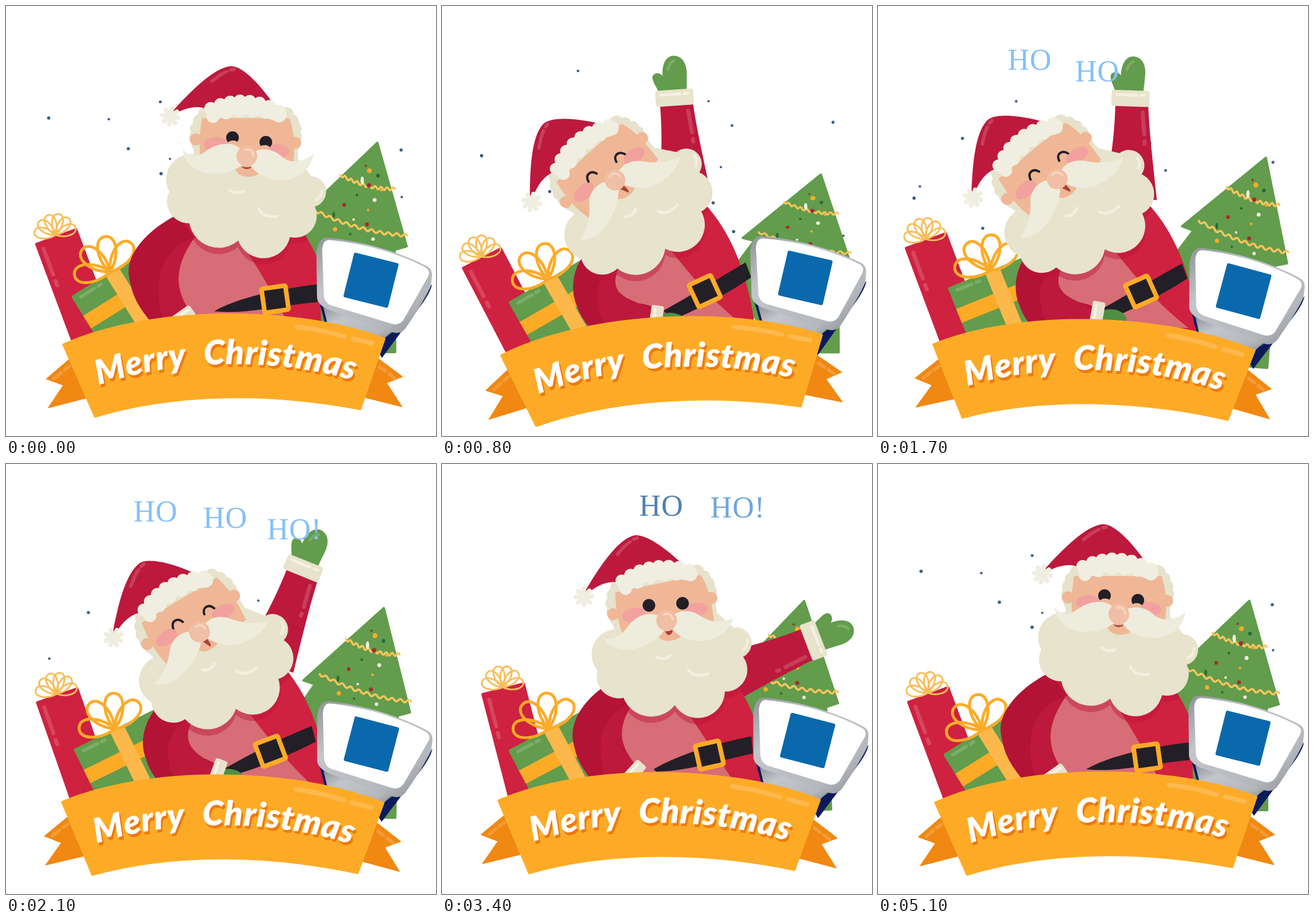
Animation, 748 px wide and 748 px high, one loop 5.2 s. Source, as an HTML page:

```html
<!DOCTYPE html>
<html lang="en">
<head>
<meta charset="utf-8">
<title>Merry Christmas</title>
<style>
  html, body { margin: 0; width: 100%; height: 100%; overflow: hidden; background: #fff; }
  svg { display: block; width: 100vw; height: 100vh; }
  .line { fill: none; stroke-linecap: round; stroke-linejoin: round; }
  .shine { fill: none; stroke: #fff; stroke-opacity: .16; stroke-linecap: round; }
  .ho { font: 52px "Liberation Serif", "Times New Roman", serif; letter-spacing: 1px; }
  .title { font: italic 900 59px Lato, "Open Sans", sans-serif; text-anchor: middle; letter-spacing: .8px; word-spacing: 18px; }
</style>
</head>
<body>
<svg viewBox="0 0 748 748">
  <defs>
    <clipPath id="bodyClip"><path id="clipShape"/></clipPath>
    <path id="beardShape" d="M-80,0 A44,44 0 0 0 -135,62 A38,38 0 0 0 -100,117 A52,52 0 0 0 -15,147 A47,47 0 0 0 75,141 A38,38 0 0 0 118,88 A27,27 0 0 0 112,35 L82,-5 Z"/>
    <path id="titleArc" d="M126,674 C262,612 484,604 640,664"/>
    <linearGradient id="metal" x2="1" y2="1">
      <stop offset="0" stop-color="#8f9398"/><stop offset=".3" stop-color="#c2c5c9"/>
      <stop offset=".75" stop-color="#b4b7bb"/><stop offset="1" stop-color="#85898f"/>
    </linearGradient>
  </defs>

  <g id="snow" fill="#3d5d82"></g>

  <g id="tree">
    <path fill="#629c4c" stroke="#629c4c" stroke-width="4" stroke-linejoin="round"
      d="M0,2 L51,182 L30,188 L31,366 L-60,366 L-170,222 L-116,138 L-136,132 Z"/>
    <path id="garlands" class="line" stroke="#fcc45c" stroke-width="3.6"/>
    <g id="baubles"></g>
  </g>

  <g id="redGift">
    <path d="M2,0 H76 Q78,0 78,3 V240 H0 V3 Q0,0 2,0Z" fill="#cf2140"/>
    <path class="shine" stroke-width="7" d="M11,14 V62 M11,74 V82"/>
    <g id="redBow" class="line" stroke="#f8bd59" stroke-width="3" transform="translate(39 -1) rotate(14)"></g>
  </g>

  <g id="greenGift">
    <path d="M3,0 H170 V150 H0 V3 Q0,0 3,0Z" fill="#629c4c"/>
    <path fill="#fdab27" d="M0,40 H170 V66 H0Z"/>
    <path fill="#fdb84c" d="M70,0 H97 V150 H70Z"/>
    <path class="shine" stroke-width="6" d="M14,10 H42 M50,10 H56"/>
    <g id="greenBow" class="line" stroke="#fdab27" stroke-width="5" transform="translate(80 0)"></g>
  </g>

  <g id="arm">
    <path fill="#bd193c" d="M-26,8 L31,8 C35,60 42,105 52,175 L-40,175 C-32,120 -25,70 -26,8Z"/>
    <path class="shine" stroke-width="7" d="M22,24 L26,62 M27,74 V78"/>
    <path fill="#629c4c" d="M-27,-10 C-28,-18 -36,-28 -36,-38 C-34,-47 -22,-46 -18,-39 C-18,-60 -10,-73 3,-73 C20,-72 26,-55 24,-38 L22,-10Z"/>
    <path class="shine" stroke-width="5" d="M-8,-50 Q-4,-62 3,-64"/>
    <rect x="-33" y="-14" width="66" height="28" rx="4" fill="#e7e3cc"/>
    <path class="line" stroke="#f4f1e2" stroke-width="5" d="M-24,-6 H10 M18,-6 H24"/>
  </g>

  <g id="body">
    <path id="torso" fill="#cf2140"/>
    <path id="belly" fill="#d76d76"/>
    <path id="sleeve" fill="#b31335"/>
    <path id="sleeveFold" fill="#bd193c"/>
    <g clip-path="url(#bodyClip)">
      <use id="beardShadow" href="#beardShape" fill="#b9153a" fill-opacity=".42"/>
    </g>
  </g>
  <path id="belt" fill="#231f26"/>
  <g id="buckle">
    <rect x="-21" y="-21" width="42" height="42" rx="2" fill="#231f26" stroke="#fdab27" stroke-width="8"/>
  </g>
  <g id="hand">
    <ellipse cx="28" cy="10" rx="24" ry="14" fill="#4f8f45"/>
    <rect x="-11" y="-13" width="22" height="40" rx="4" fill="#e7e3cc"/>
    <path class="line" stroke="#f4f1e2" stroke-width="5" d="M-4,-6 V16"/>
  </g>

  <g id="head">
    <path fill="#e6e2cc" d="M-86,-60 C-80,-96 66,-100 82,-60 L90,-40 L88,30 L-88,24 L-96,-30Z"/>
    <path id="curls" class="line" stroke="#e6e2cc" stroke-width="24"/>
    <use href="#beardShape" fill="#e7e3cc"/>
    <path class="line" stroke="#f2efdf" stroke-width="5" d="M-30,59 Q-18,68 -6,61 M20,91 Q26,107 52,105 M120,76 Q130,72 131,60"/>
    <path fill="#bd193c" d="M-130,-77 C-95,-116 -58,-152 -30,-156 C-8,-160 28,-118 48,-88 L-60,-76 C-80,-92 -108,-84 -128,-72Z"/>
    <path class="shine" stroke-width="6" d="M-61,-130 Q-45,-143 -35,-147 M-28,-150 L-22,-151"/>
    <path fill="#efb796" d="M-78,-66 C-84,-30 -84,0 -76,24 L80,24 C83,-10 84,-40 74,-66Z"/>
    <path class="line" stroke="#efb796" stroke-width="21" d="M-89,-29h0M84,-23h0"/>
    <path class="line" stroke="#f0eee0" stroke-width="26" d="M-58,-76 Q0,-98 56,-72"/>
    <path id="fur" class="line" stroke="#f0eee0" stroke-width="22"/>
    <g id="pompom" class="line" stroke="#f0eee0" stroke-width="8" transform="translate(-133 -69)"></g>
    <g fill="#f2a19f">
      <ellipse cx="-54" cy="-21" rx="21" ry="12" transform="rotate(-3 -54 -21)"/>
      <ellipse cx="53" cy="-9" rx="21" ry="12" transform="rotate(6 53 -9)"/>
    </g>
    <g id="openEyes">
      <path class="line" stroke="#231f26" stroke-width="22" d="M-25,-32h0M33,-24h0"/>
      <g id="squint" fill="#efb796">
        <ellipse cx="-24" cy="-22" rx="9" ry="5"/><ellipse cx="31" cy="-14" rx="9" ry="5"/>
      </g>
    </g>
    <path id="shutEyes" class="line" stroke="#231f26" stroke-width="4" d="M-36,-29 C-33,-42 -20,-42 -16,-30 M23,-22 C26,-35 39,-34 43,-22"/>
    <ellipse cx="3" cy="23" rx="22" ry="13" fill="#efb796"/>
    <path id="mouth" fill="#a8433a"/>
    <g fill="#eeecdc"><path id="stacheL"/><path id="stacheR"/></g>
    <circle r="18" fill="#f0bfa5"/>
    <path class="line" stroke="#f6d3bf" stroke-width="4" d="M-2,-11 Q10,-13 11,0"/>
  </g>

  <g id="device">
    <path fill="#0c1a5c" d="M741,484 Q740,494 726,515 L654,612 L640,590 L690,555Z M541,500 L556,556 L575,556 L552,512Z"/>
    <path fill="url(#metal)" d="M552,524 L560,556 Q610,590 655,582 L676,560Z"/>
    <path fill="url(#metal)" d="M560,403 C620,409 685,428 733,453 Q742,458 741,470 L739,487 C730,508 706,545 694,562 Q686,571 674,568 L560,528 Q543,520 541,508 L540,430 Q543,402 560,403Z"/>
    <path fill="#fff" d="M562,407 C620,412 685,431 730,455 Q739,461 734,471 L692,545 Q685,556 672,553 L566,521 Q554,516 553,504 L550,424 Q551,407 562,407Z"/>
    <rect x="-40" y="-40" width="80" height="80" rx="3" fill="#0a69ac" transform="translate(635 477) rotate(14)"/>
  </g>

  <g id="banner">
    <g fill="#f08812">
      <path d="M112,612 L69,649 L99,660 L72,700 L142,682Z"/>
      <path d="M644,610 L691,645 L663,656 L690,698 L618,680Z"/>
    </g>
    <path class="shine" stroke-width="6" d="M84,648 L96,638 M102,633 L110,627 M650,628 L660,635 M667,640 L676,647"/>
    <path fill="#fdab27" stroke="#fdab27" stroke-width="4" stroke-linejoin="round"
      d="M100,589 C250,522 500,520 658,579 L616,701 C470,673 300,670 155,714Z"/>
    <path class="line" stroke="#fdb94f" stroke-width="8" d="M506,558 Q550,563 589,575 M604,579 L637,587"/>
    <text class="title" fill="#ee7a10" transform="translate(3 5)"><textPath href="#titleArc" startOffset="50%">Merry Christmas</textPath></text>
    <text class="title" fill="#fff"><textPath href="#titleArc" startOffset="50%">Merry Christmas</textPath></text>
  </g>

  <text class="ho">HO</text>
  <text class="ho">HO</text>
  <text class="ho">HO!</text>
</svg>

<script>
const LOOP = 5200, STEP = 100;
const $ = id => document.getElementById(id);
const clamp = v => Math.max(0, Math.min(1, v));
const lerp = (a, b, k) => a + (b - a) * k;
const mix = (a, b, k) => a.map((v, i) => lerp(v, b[i], k));
const set = (id, d) => $(id).setAttribute('d', d);

function ramp(t, from, to) {
  const u = clamp((t - from) / (to - from));
  return u * u * (3 - 2 * u);
}
const hold = (t, a, b, c, d) => ramp(t, a, b) - ramp(t, c, d);

function seeded(seed) {
  return () => (seed = seed * 16807 % 2147483647) / 2147483647;
}

function add(parent, tag, attrs) {
  const el = document.createElementNS('http://www.w3.org/2000/svg', tag);
  for (const k in attrs) el.setAttribute(k, attrs[k]);
  return parent.appendChild(el);
}

// Blends two paths of the same structure.
function morph([a, b], k) {
  const nums = b.match(/-?[\d.]+/g);
  let i = 0;
  return a.replace(/-?[\d.]+/g, n => lerp(+n, +nums[i++], k).toFixed(1));
}

// Each pair is upright, leaning.
const bodyShapes = {
  torso: [
    'M300,365 C240,395 205,440 216,480 C222,515 240,535 262,560 L548,560 L546,450 C535,420 520,395 500,370Z',
    'M270,415 C225,440 222,495 235,522 C241,540 250,552 262,565 L546,565 L543,548 C533,480 510,400 455,342Z'],
  belly: [
    'M328,403 C285,435 280,470 290,490 C300,515 320,535 335,560 L494,560 C470,510 440,455 400,400Z',
    'M310,455 C283,480 296,514 340,517 C365,520 398,530 400,560 L530,560 C470,515 430,465 390,415Z'],
  sleeve: [
    'M300,362 C240,392 205,437 215,475 C221,512 240,535 260,560 L345,560 C320,535 300,515 290,490 C280,470 285,435 328,403Z',
    'M270,415 C225,440 222,495 235,522 C241,540 250,552 262,565 L385,565 C385,530 365,520 340,517 C296,514 283,480 310,450Z'],
  sleeveFold: [
    'M328,403 C268,420 250,485 278,560 L345,560 C300,515 280,470 328,403Z',
    'M310,450 C268,465 255,510 290,565 L385,565 C385,500 270,530 310,450Z'],
  belt: [
    'M362,531 C390,515 440,497 542,484 L542,515 C480,520 420,537 362,531Z',
    'M385,530 C430,505 480,475 528,446 L538,472 C490,505 440,530 400,546Z']
};
// Each pair is curled up, drooping.
const faceShapes = {
  stacheL: [
    'M0,4 C-12,-30 -50,-25 -72,-8 C-90,5 -105,0 -112,-14 C-110,15 -85,32 -55,31 C-30,30 -15,22 -3,12Z',
    'M0,4 C-12,-18 -46,-20 -62,2 C-76,20 -95,32 -115,37 C-95,55 -70,52 -45,42 C-25,34 -12,24 -3,12Z'],
  stacheR: [
    'M2,4 C14,-18 45,-15 62,2 C80,16 100,8 116,-3 C110,28 85,43 55,42 C30,40 12,28 5,13Z',
    'M2,4 C14,-14 40,-14 58,8 C74,28 92,40 112,45 C94,60 66,60 44,52 C24,44 12,30 5,13Z'],
  mouth: [
    'M-9,18 C-4,20 4,20 8,18 C7,24 -7,24 -9,18Z',
    'M-4,17 C-1,18 2,18 5,17 C6,26 6,30 3,32Z']
};

// Static details
function bow(id, size, loops, first, gap) {
  const w = size * .34;
  for (let i = 0; i < loops; i++) add($(id), 'path', {
    d: `M0,0 C${-w},${-size * .4} ${-w},${-size} 0,${-size} C${w},${-size} ${w},${-size * .4} 0,0Z`,
    transform: `rotate(${first + gap * i})`
  });
}
bow('redBow', 37, 6, -75, 30);
bow('greenBow', 62, 4, -62, 43);

for (let i = 0; i < 8; i++)
  add($('pompom'), 'path', { d: 'M0,0 V-14', transform: `rotate(${i * 45 + 10})` });

let curls = '', fur = '';
for (const side of [-1, 1])
  for (let a = -.5; a < .8; a += .22)
    curls += `M${-2 + side * 86 * Math.cos(a)},${-38 - 62 * Math.sin(a)}h0`;
for (let x = -63; x < 60; x += 17) fur += `M${x},${-96 + .0043 * (x + 8) ** 2}h0`;
for (let x = -59; x < 60; x += 23) fur += `M${x},${-79 + .003 * x * x}h0`;
set('curls', curls);
set('fur', fur);

function garland(x0, y0, x1, y1, sag, waves) {
  let d = '';
  for (let i = 0; i <= waves * 8; i++) {
    const u = i / (waves * 8);
    const y = lerp(y0, y1, u) + sag * 4 * u * (1 - u) + 2.6 * Math.sin(u * waves * 2 * Math.PI);
    d += (i ? 'L' : 'M') + lerp(x0, x1, u).toFixed(1) + ',' + y.toFixed(1);
  }
  return d;
}
set('garlands', garland(-64, 58, 30, 82, 7, 9) + garland(-108, 120, 52, 163, 9, 11));

const rand = seeded(29);
const tints = ['#a52a30', '#fdab27', '#256b35', '#f0eee0'];
for (let i = 0; i < 16; i++) {
  const cy = 42 + i * 8.5, r = 2 + rand() * 2.6;
  add($('baubles'), 'ellipse', {
    cx: lerp(-.6 * cy, .14 * cy, (i * .382 + rand() * .2) % 1), cy,
    rx: r, ry: i % 7 === 3 ? r * 2.4 : r, fill: tints[i % 4]
  });
}

const flakes = Array.from({ length: 28 }, () => ({
  x: lerp(60, 690, rand()), y: lerp(90, 330, rand()),
  vx: lerp(-13, 20, rand()), vy: lerp(55, 88, rand()),
  born: lerp(-1100, 1200, rand()), life: lerp(1100, 2300, rand()),
  dot: add($('snow'), 'circle', { r: lerp(2, 3, rand()) })
}));
const words = [...document.querySelectorAll('.ho')];

const show = (el, on) => el.setAttribute('visibility', on ? 'visible' : 'hidden');
const place = (id, [x, y, r = 0]) =>
  $(id).setAttribute('transform', `translate(${x} ${y}) rotate(${r})`);
const pivot = (id, [x, y, r], cx, cy, sy = 1) =>
  $(id).setAttribute('transform', `translate(${x + cx} ${y + cy}) rotate(${r}) scale(1 ${sy}) translate(${-cx} ${-cy})`);

function drawScene(t) {
  // Strength of the thump, the rebound and the settled tilt
  const thump = hold(t, 550, 750, 850, 1250), rebound = hold(t, 1000, 1650, 1700, 2500);
  const tilt = hold(t, 1900, 2600, 3400, 4200), drift = hold(t, 1900, 2600, 3400, 5100);
  const sum = (base, a, b, c, last) => base.map((v, i) => v + a[i] * thump + b[i] * rebound + c[i] * last);
  const still = [0, 0, 0];

  pivot('banner', sum(still, [5, 6, -2.6], [-5, 10, 2.1], [-2, 1, .9], tilt), 380, 630);
  pivot('device', sum(still, [-3, -4, -1], [1, 19, 1], [1, 4, .3], tilt), 635, 478);
  place('redGift', sum([50, 413, -20.5], [-16, 42, -7], [-4, 7, 0], [18, -14, 6], drift));
  place('greenGift', sum([113, 505, -32], [2, 10, 2], [8, -15, 10], [2, -7, 4], drift));
  const [x, y, r] = sum(still, [13, 0, 0], [0, 25, 4.5], [0, 0, -2.5], drift);
  $('tree').setAttribute('transform',
    `translate(${646 + x} ${605 + y}) rotate(${r}) scale(1 ${1 - .15 * thump}) translate(0 -369)`);
}

function drawSanta(t) {
  const lean = ramp(t, 200, 750) - .05 * ramp(t, 800, 1700) - .5 * ramp(t, 1700, 2600)
    - .18 * ramp(t, 2600, 3400) - .27 * ramp(t, 3400, 4100);
  const shift = 13 * hold(t, 800, 1900, 3000, 4100);

  for (const id in bodyShapes) set(id, morph(bodyShapes[id], lean));
  set('clipShape', $('torso').getAttribute('d'));
  place('body', [shift, 0]);
  place('buckle', mix([468, 510, -8], [457, 496, -25], lean));
  const [px, py, pr] = mix([314, 536, 55], [374, 534, 8], lean);
  place('hand', [px + shift, py - shift * .6, pr]);

  const [x, y, r] = mix([419, 261, 0], [301, 303, -42], lean);
  place('head', [x + shift * .4, y, r]);
  place('beardShadow', [x - shift * .6, y + 11, r]);

  // The arm swings on the shoulder like a clock hand.
  const angle = -4 + 6 * ramp(t, 800, 1700) + 48 * ramp(t, 1700, 2600)
    + 19 * ramp(t, 2600, 3400) + 50 * ramp(t, 3500, 4050);
  const reach = 194 * hold(t, 350, 780, 3600, 4100), a = angle * Math.PI / 180;
  const [sx, sy] = mix([470, 385], [418, 353], lean);
  place('arm', [sx + shift + reach * Math.sin(a), sy - reach * Math.cos(a), angle]);
  show($('arm'), reach > 20);

  const droop = ramp(t, 200, 600) - .55 * ramp(t, 3000, 3200) - .45 * ramp(t, 3500, 4100);
  for (const id in faceShapes) set(id, morph(faceShapes[id], droop));
  const shut = t >= 400 && t < 3100;
  show($('shutEyes'), shut);
  show($('openEyes'), !shut);
  $('squint').setAttribute('opacity', t >= 3100 && t < 3900 ? 0 : 1);
}

function drawWords(t) {
  words.forEach((el, i) => {
    const born = 1100 + 400 * i, end = 3300 + 150 * i;
    const rise = Math.exp((born - t) / 700), dim = clamp((t - end + 300) / 400);
    show(el, t >= born && t < end);
    el.setAttribute('x', 343 + (i - 1) * (126 - 20 * rise));
    el.setAttribute('y', 86 + 60 * rise);
    el.setAttribute('fill', `rgb(${mix([133, 192, 248], [50, 90, 135], dim)})`);
  });
}

function drawSnow(t) {
  for (const f of flakes) {
    const age = (t - f.born + LOOP) % LOOP, s = age / 1000;
    show(f.dot, age < f.life);
    f.dot.setAttribute('cx', f.x + f.vx * s);
    f.dot.setAttribute('cy', f.y + f.vy * s);
  }
}

const start = performance.now();
function tick() {
  const t = Math.floor((performance.now() - start) % LOOP / STEP) * STEP;
  drawScene(t);
  drawSanta(t);
  drawWords(t);
  drawSnow(t);
  requestAnimationFrame(tick);
}
tick();
</script>
</body>
</html>
```
